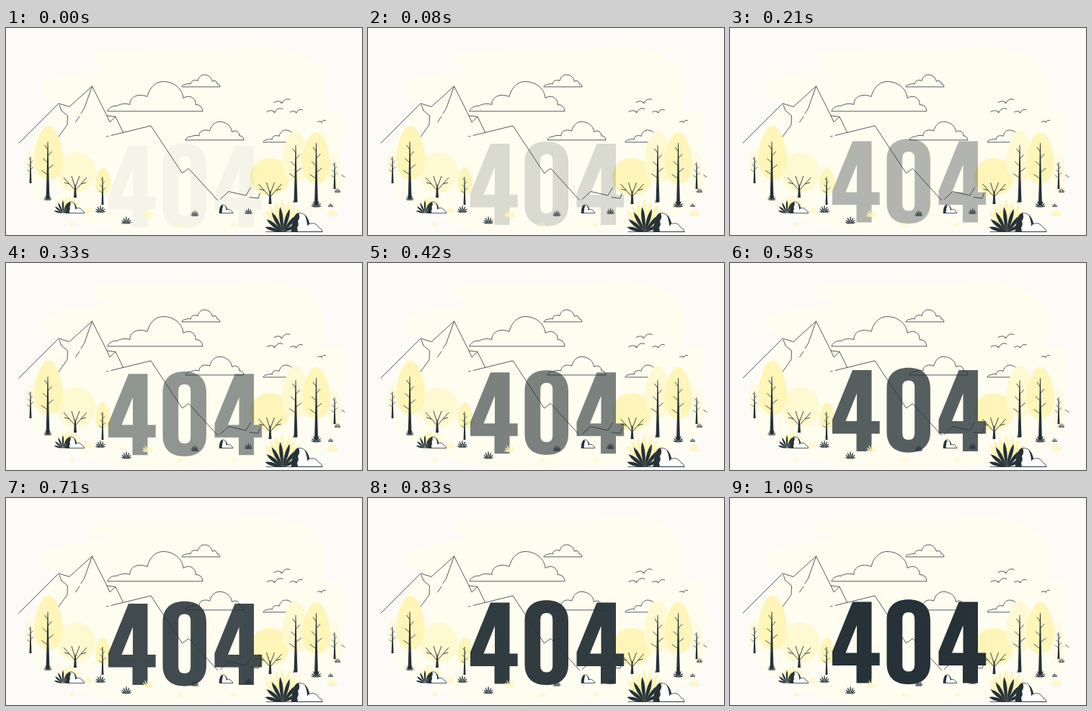
These frames come from a looping animation (494 by 288 pixels, 1.04 s). An HTML page:

```html
<!DOCTYPE html>
<html lang="en">
<head>
<meta charset="utf-8">
<title>404</title>
<style>
  html, body { margin: 0; width: 100%; height: 100%; overflow: hidden; background: #fcfbf7; }
  svg { display: block; width: 494px; height: 288px; }
  .line { fill: none; stroke: #263238; stroke-width: .8; stroke-linejoin: round; stroke-linecap: round; }
</style>
</head>
<body>
<svg viewBox="0 0 494 288">
  <path fill="#fffdf0" d="M113 33Q175 28 312 30Q345 22 372 27Q405 34 418 42Q442 57 442 85Q442 108 437 118
    Q455 113 469 120Q471 150 465 180Q472 212 464 235Q448 262 400 276Q330 284 220 287Q165 287 140 280
    Q80 265 42 238Q22 205 30 175Q45 130 78 103Q52 100 48 85Q52 71 88 65Q125 61 145 55Q118 50 116 45Q135 40 113 33Z"/>
  <g id="back"></g>
  <g id="digits" fill="#263238" fill-rule="evenodd" role="img" aria-label="404">
    <path id="four" d="M170 144.5H196.500V215.500H207.700V233H196.500V257.500H175.500V233H142V213.500ZM176 177L160.500 215.500H176Z"/>
    <path d="M217.500 170C217.500 151 229 141.300 247.700 141.300S278 151 278 170V230.500C278 249.500 266.500 259.200 247.700 259.200S217.500 249.500 217.500 230.500Z
      M239.200 168V232.500Q239.200 241.500 247.700 241.500T256.200 232.500V168Q256.200 159 247.700 159T239.200 168Z"/>
    <use href="#four" x="147.500"/>
  </g>
  <g id="front"></g>
</svg>
<script>
const INK = '#263238', FAINT = '#fffae0', PALE = '#fff9d2', YELLOW = '#fff5b9';
const $ = id => document.getElementById(id);

const line = d => `<path class="line" d="${d}"/>`;
const fill = (d, color = INK) => `<path fill="${color}" d="${d}"/>`;
const twigs = (d, w) => `<path d="${d}" fill="none" stroke="${INK}" stroke-width="${w}"/>`;
const place = (x, y, s, body) => `<g transform="translate(${x} ${y}) scale(${s})">${body}</g>`;
const disc = (x, y, rx, ry, color) => `<ellipse cx="${x}" cy="${y}" rx="${rx}" ry="${ry}" fill="${color}"/>`;

// Egg-shaped crown between two heights
function crown(x, top, bottom, r, color = YELLOW) {
  const mid = top + (bottom - top) * .6, low = mid + (bottom - mid) * .6;
  return fill(`M${x} ${top}C${x + r * .6} ${top} ${x + r} ${mid - r * .7} ${x + r} ${mid}
    C${x + r} ${low} ${x + r * .6} ${bottom} ${x} ${bottom}
    S${x - r} ${low} ${x - r} ${mid}C${x - r} ${mid - r * .7} ${x - r * .6} ${top} ${x} ${top}Z`, color);
}

// Tapered trunk with thin alternating branches
function trunk(x, top, bottom, w, reach) {
  const h = bottom - top;
  const branches = [.14, .25, .37, .48, .58].map((f, i) => {
    const y = top + h * f, dx = (i % 2 ? 1 : -1) * reach * (.5 + i * .12);
    return `M${x} ${y}L${x + dx} ${y - reach * .7}`;
  }).join('');
  return fill(`M${x - .4} ${top}H${x + .4}L${x + w * .3} ${top + h * .6}L${x + w / 2} ${bottom}H${x - w / 2}L${x - w * .3} ${top + h * .6}Z`) +
    twigs(branches, .35 + w * .1);
}

// Short trunk that opens into a fan of branches
const fork = (x, y) => place(x, y, 1,
  fill('M-2 0L-1-14L0-20L1-14L2 0Z') +
  twigs('M0-10L-16-28M-8-19L-15-21M0-10L16-28M8-19L15-21M0-14L-5-30M0-14L6-30', .9));

function bush(x, y, size, color = INK, from = -75, to = 75) {
  let leaves = '';
  for (let i = 0; i < 7; i++) {
    const a = from + (to - from) * i / 6, n = size * (1 - Math.abs(a) / 260);
    const w = size * .14;
    leaves += `<path transform="rotate(${a})" d="M0 0Q${-w} ${-n * .65} 0 ${-n}Q${w} ${-n * .65} 0 0Z"/>`;
  }
  return `<g fill="${color}">${place(x, y, 1, leaves)}</g>`;
}

const rocks = (x, y, s) => place(x, y, s,
  `<path d="M0 0C1-14 4-26 11-26C18-26 22-22 25-11Q34-14 38-6Q43-4 43 0Z" fill="#fff" stroke="${INK}" stroke-width="${.8 / s}"/>` +
  fill('M0 0C1-14 4-26 10-26Q13-20 9-15Q11-9 8-6L9 0ZM18-24Q23-20 25-11L22-8Q22-16 18-24Z'));

const cloud = (x, y, width) => place(x, y, width / 132,
  `<path class="line" vector-effect="non-scaling-stroke" d="M0 0C1-4 7-8 13-7C17-10 25-11 31-9
    C30-18 41-26 55-20C58-33 67-41 77-41C92-41 104-31 105-18Q112-22 117-19Q123-15 122-9Q131-9 132 0Z"/>`);

const bird = (x, y, width) => place(x, y, width / 22,
  `<path class="line" vector-effect="non-scaling-stroke" d="M-11 2Q-4-2 0 3Q4-5 11-2M0 3L-2 2"/>`);

$('back').innerHTML = [
  line('M18 160L73 105L88 109.500L119.500 81L140 122L152 123.500L162.500 145'),
  line('M74 107L77 115L85.500 122L85 134.500L72.500 152M119.500 81L108.500 112L104 119M102 123L96.500 131M140 122L144 131L152 123.500'),
  line('M139.500 151L142 150.500M146 149.500L201 136L244.500 202L253.500 195.500L293.500 239.500'),
  line('M297 238.500L309 227.500L333 233L339.500 222M338 235.500L350 237L352.500 229.500M465 204L470 207.500'),
  cloud(141, 115.500, 132), cloud(244, 81.500, 53), cloud(249, 155.500, 81), cloud(357, 158.500, 53),
  bird(383, 101.500, 22), bird(373, 114.500, 22), bird(403, 115.500, 17), bird(438, 129.500, 11),

  crown(34, 168, 209, 8, FAINT), disc(98, 201, 27, 28, PALE),
  crown(59, 136, 211, 20), crown(134.500, 194, 231, 10.500),
  disc(366, 207, 27.500, 26, YELLOW), crown(402, 143, 215, 19, PALE),
  crown(456.500, 173, 228, 9, FAINT), crown(430.500, 145, 217, 19.500),
  trunk(34, 179, 216, 3, 5), trunk(58, 158, 238, 5, 9), trunk(134, 207, 246, 3, 5),
  trunk(402, 163, 242, 5, 9), trunk(430.500, 160, 246, 5, 9), trunk(456, 187, 224, 3, 5),
  fork(96, 236), fork(366.500, 245),

  bush(58, 240, 9), bush(131, 257, 11), bush(167, 272.500, 11), bush(262, 262, 9), bush(336.500, 259, 9),
  bush(401, 243, 5), bush(430.500, 249.500, 11), bush(450.500, 249, 6), bush(460, 229, 7),
  rocks(296, 257.500, .44)
].join('');

$('front').innerHTML = [
  bush(197, 263, 12, YELLOW), bush(242, 276.500, 7, YELLOW), bush(316, 276, 7, YELLOW),
  bush(92, 275.500, 7, YELLOW), bush(115, 257, 9, YELLOW), bush(453, 262, 12, YELLOW),
  bush(87, 256, 25, YELLOW, -40, 45), bush(79, 257.500, 18), rocks(83, 257.500, .6),
  bush(384, 283, 46, YELLOW, -40, 38), bush(384, 284, 36, INK, -74, 62),
  rocks(396, 283.500, 1), line('M361 283.500H439')
].join('');

const LOOP = 1040, STEPS = 25, DROP = 20;
const start = performance.now();

function draw() {
  const t = (performance.now() - start) % LOOP;
  // The motion advances at 24 steps per second
  const step = Math.min(STEPS - 1, Math.floor((t + 3.5) * 24 / 1000));
  const p = 1 - (1 - (step + .6) / STEPS) ** 1.7;
  $('digits').setAttribute('opacity', p);
  $('digits').setAttribute('transform', `translate(0 ${DROP * (1 - p)})`);
  requestAnimationFrame(draw);
}
draw();
</script>
</body>
</html>
```
